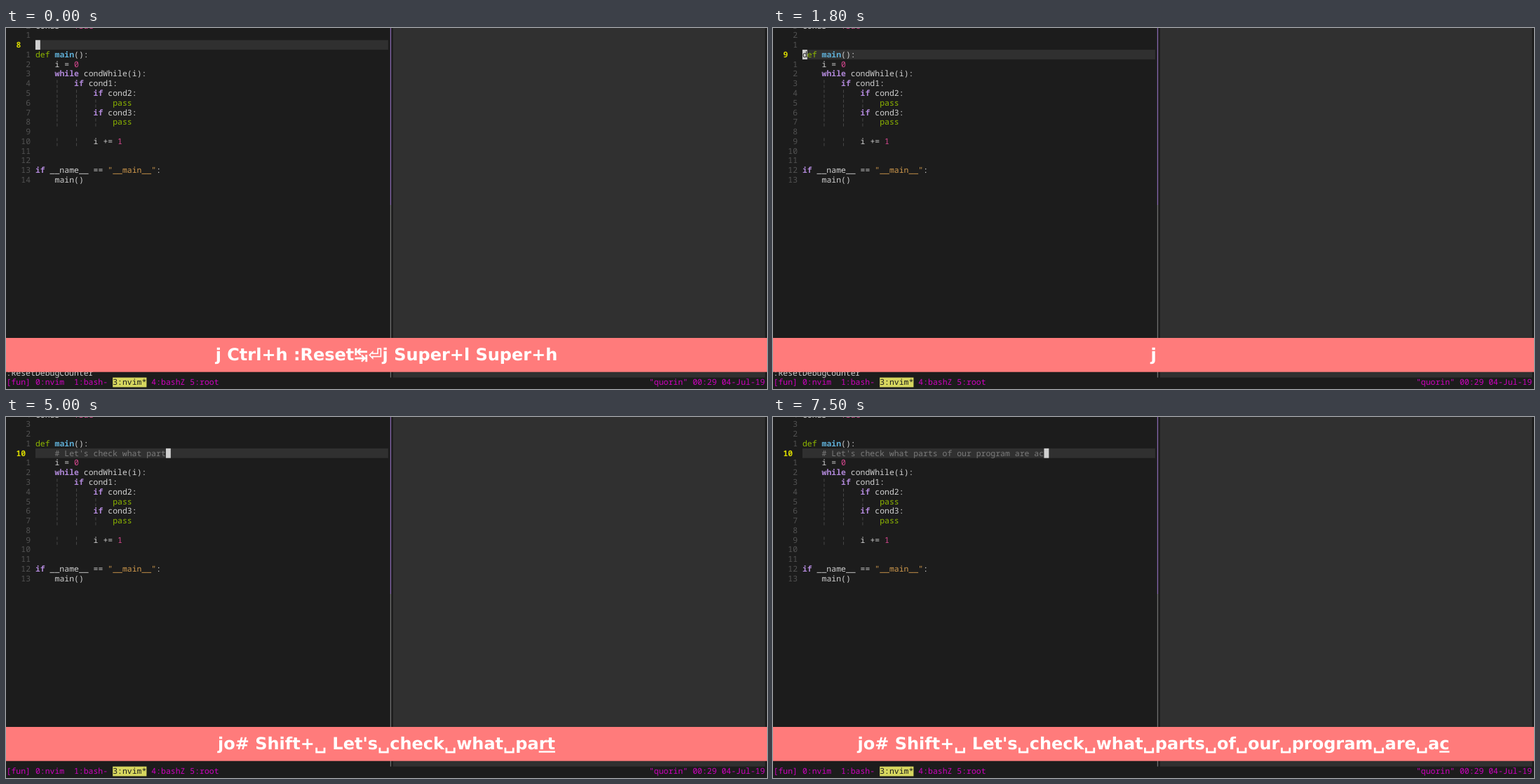
Write an HTML page that moves like this. It is 1085 px wide and 516 px high and loops after 8 s.

```html
<!DOCTYPE html>
<html lang="en">
<head>
<meta charset="utf-8">
<title>Terminal session</title>
<style>
html, body { margin: 0; width: 100%; height: 100%; overflow: hidden; background: #1c1c1c; }
svg { display: block; width: 100vw; height: 100vh; }
text { white-space: pre; text-rendering: geometricPrecision; }
.mono { font: 11.483px "Noto Sans Mono", monospace; }
.keys { font: bold 24px "DejaVu Sans", sans-serif; fill: #fff; text-anchor: middle; }
.b { font-weight: bold; }
.u { text-decoration: underline; text-decoration-thickness: 1.3px; text-decoration-skip-ink: none; }
</style>
</head>
<body>
<svg id="stage" viewBox="0 0 1085 516" preserveAspectRatio="none"></svg>
<script>
const LOOP = 8000, CW = 6.89, RH = 13.78, X0 = 0.6, GUTTER = 6;
const C = {
  bg: '#1c1c1c', pane: '#303030', fg: '#d0d0d0', num: '#525252', cur: '#d7d700',
  def: '#8fb800', fn: '#5fafd7', kw: '#af87d7', lit: '#d7478f', str: '#d0994c',
  note: '#7a7a7a', guide: '#4e4e4e', tmux: '#d000c0', tab: '#d7d75f',
  lime: '#d7ff00', grey: '#444', file: '#5fd7a7', band: '#ff7b7b'
};

const CODE = [
  'cond3 = True', '', '', 'def main():', '    i = 0', '    while condWhile(i):',
  '        if cond1:', '            if cond2:', '                pass',
  '            if cond3:', '                pass', '', '            i += 1', '', '',
  'if __name__ == "__main__":', '    main()'
];
const NOTE = "# Let's check what parts of our program are ac";

// [start, pressed keys, underlined tail length, text typed in the comment, cursor shown]
const TYPED = [
  [2000, 'jo', 0, ''],
  [3700, 'ch', 2],
  [4300, 'check ', 2],
  [5000, 'part', 2],
  [5800, 'of o', 1, 'of', false],
  [6300, 'pro', 2],
  [7000, 'are', 2],
  [7500, 'ac', 1]
];

const colX = c => X0 + c * CW;
const rowY = r => 17.3 + (r - 2) * RH;
const esc = s => s.replace(/&/g, '&amp;').replace(/</g, '&lt;').replace(/ /g, '\u00a0');
const rect = (x, y, w, h, fill) => `<rect x="${x}" y="${y}" width="${w}" height="${h}" fill="${fill}"/>`;
const cells = (c, r, n, fill) => rect(colX(c), rowY(r), n * CW, RH, fill);
const put = (c, r, s, fill, cls = '') =>
  `<text class="mono ${cls}" x="${colX(c)}" y="${rowY(r) + 10.8}" fill="${fill}">${esc(s)}</text>`;

function arrow(c, r, dir, fill) {
  const a = colX(dir > 0 ? c : c + 1), b = colX(dir > 0 ? c + 1 : c), y = rowY(r);
  return `<path d="M${a} ${y}L${b} ${y + RH / 2}L${a} ${y + RH}Z" fill="${fill}"/>`;
}

function style(word, before) {
  if (/^(if|while)$/.test(word)) return [C.kw, 'b'];
  if (/^(def|pass)$/.test(word)) return [C.def];
  if (word === 'main' && before === 'def ') return [C.fn, 'b'];
  if (/^(\d+|True)$/.test(word)) return [C.lit];
  if (word[0] === '"') return [C.str];
  return [C.fg];
}

function codeLine(line, r) {
  let out = '';
  const indent = line.search(/\S/);
  for (let k = 4; k < indent; k += 4) out += put(GUTTER + k, r, '¦', C.guide);
  for (const m of line.matchAll(/"[^"]*"|\w+|[^\w\s"]+/g))
    out += put(GUTTER + m.index, r, m[0], ...style(m[0], line.slice(0, m.index)));
  return out;
}

function editor(s) {
  let out = cells(GUTTER, s.row, 73, C.pane);
  const lines = CODE.slice();
  if (s.note !== null) lines.splice(4, 0, '');
  lines.forEach((line, r) => {
    const here = r === s.row, n = String(here ? r + 6 : Math.abs(r - s.row));
    out += here ? put(2, r, n, C.cur, 'b') : put(5 - n.length, r, n, C.num);
    out += codeLine(line, r);
  });
  if (s.note) out += put(GUTTER + 4, 4, s.note, C.note);
  if (s.cursor) out += cells(GUTTER + s.col, s.row, 1, C.fg);
  if (s.row === 3) out += put(GUTTER, 3, 'd', C.bg);
  return out;
}

function statusLine() {
  const r = 35, ink = '#111';
  return cells(0, r, 8.05, C.lime) + cells(8, r, 1.05, C.grey) + arrow(8, r, 1, C.lime) +
    arrow(9, r, 1, C.grey) + put(1, r, 'NORMAL', ink, 'b') + put(11, r, 'a.py', C.file) +
    put(47, r, 'pyt…', C.file) + arrow(52, r, -1, C.grey) + cells(53, r, 1, C.grey) +
    arrow(53, r, -1, C.lime) + cells(54, r, 25.1, C.lime) + put(55, r, '$', ink) +
    put(58, r, '36%', ink) + put(62, r, '☰', ink) + put(67, r, '8/22', ink, 'b') +
    `<g font-family="Noto Sans Mono, monospace" font-size="7.5" font-weight="bold" fill="${ink}">` +
    '<text x="496.4" y="479">L</text><text x="499.2" y="485">N</text></g>' +
    put(74, r, ':', ink, 'b') + put(77, r, '1', ink);
}

function frame() {
  const r = 37, edge = rowY(r), mid = 253;
  return rect(colX(80), 0, 77 * CW, edge, C.pane) +
    rect(547.8, 0, 1.3, mid, '#8768ad') + rect(547.8, mid, 1.3, edge - mid, '#707070') +
    cells(22, r, 7, C.tab) + put(0, r, '[fun] 0:nvim  1:bash-', C.tmux) +
    put(22, r, '3:nvim*', C.bg) + put(30, r, '4:bashZ 5:root', C.tmux) +
    put(133, r, '"quorin" 00:29 04-Jul-19', C.tmux);
}

function band(keys, tail) {
  const cut = keys.length - tail;
  return rect(0, 443, 1085, 48.7, C.band) +
    `<text class="keys" x="542.5" y="475.3">${keys.slice(0, cut)}` +
    (tail ? `<tspan class="u">${keys.slice(cut)}</tspan>` : '') + '</text>';
}

function stateAt(t) {
  const s = { row: 2, col: 0, note: null, cursor: true, keys: '', tail: 0, msg: t < 4300, cmd: false };
  if (t < 200) s.keys = 'j Ctrl+h :Reset↹⏎j Super+l Super+h';
  else if (t >= 1700 && t < 2000) {
    s.keys = t < 1900 ? 'j' : 'jo';
    s.cmd = t < 1800;
    if (t >= 1800) s.row = 3;
  } else if (t >= 2000) {
    const [, end, tail, shown = end, cursor = true] = TYPED.filter(k => k[0] <= t).pop();
    const upTo = w => NOTE.slice(0, NOTE.lastIndexOf(w) + w.length);
    s.row = 4;
    s.note = shown && upTo(shown);
    s.col = 4 + s.note.length;
    s.cursor = cursor;
    s.tail = tail;
    s.keys = end === 'jo' ? end : 'jo# Shift+␣ ' + upTo(end).slice(2).replace(/ /g, '␣');
  }
  return s;
}

const stage = document.getElementById('stage');
let last = '';

function draw(t) {
  const s = stateAt(t), key = JSON.stringify(s);
  if (key === last) return;
  last = key;
  stage.innerHTML = rect(0, 0, 1085, 516, C.bg) + frame() + editor(s) + statusLine() +
    (s.msg ? put(0, 36, ':ResetDebugCounter', C.fg) : '') +
    (s.cmd ? put(68, 36, 'j', C.fg) : '') +
    (s.keys ? band(s.keys, s.tail) : '');
}

const start = performance.now();
function tick() {
  draw((performance.now() - start) % LOOP);
  requestAnimationFrame(tick);
}
tick();
</script>
</body>
</html>
```
